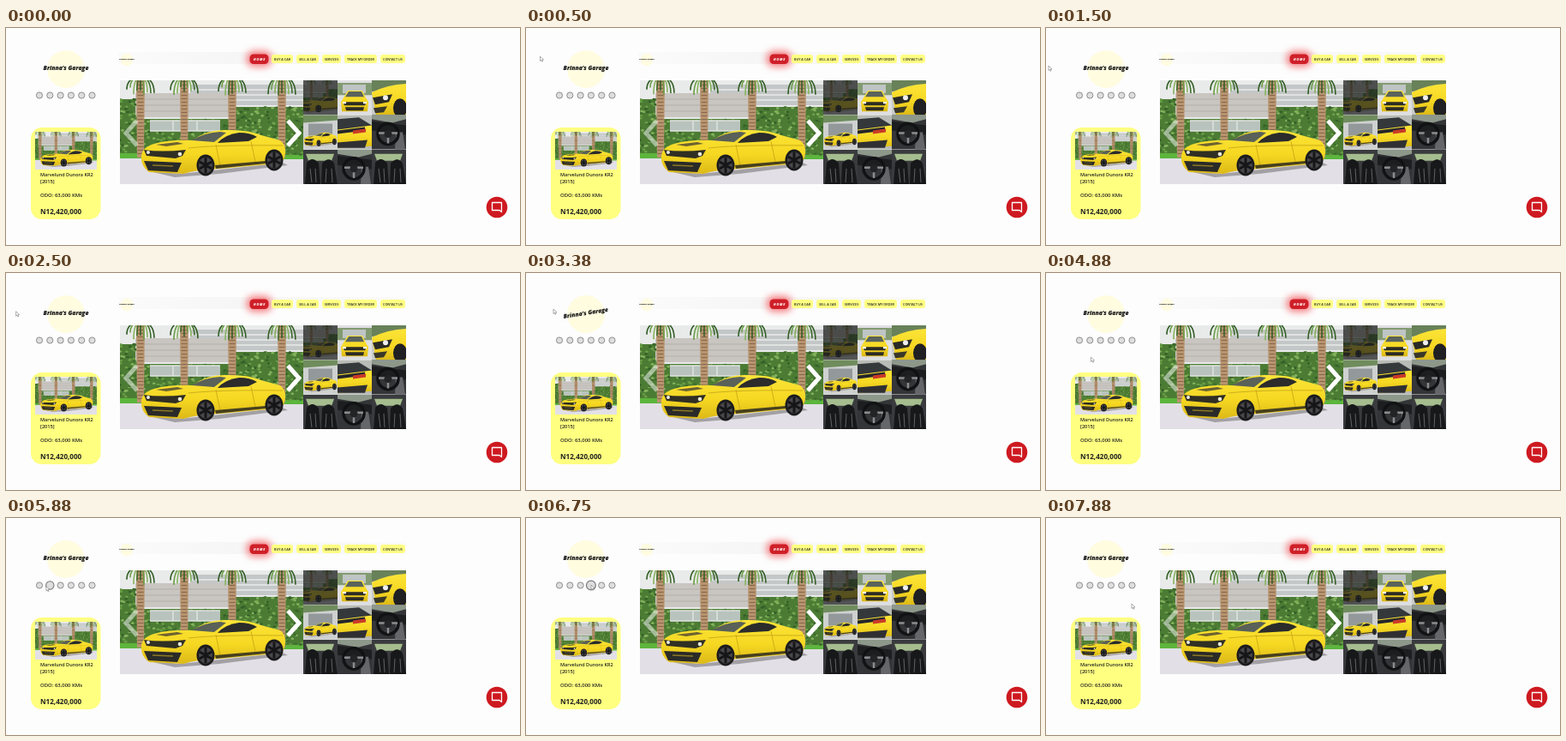
An HTML page that plays this animation: 600x253 px, repeating every 8 s.

```html
<!DOCTYPE html>
<html lang="en">
<head>
<meta charset="utf-8">
<title>Car shop</title>
<style>
  html, body { margin: 0; width: 100%; height: 100%; overflow: hidden; background: #fdfdfd; }
  svg { display: block; }
  text { font-family: "Open Sans", "Noto Sans", sans-serif; fill: #222; }
  .brand { font-weight: 800; font-style: italic; text-anchor: middle; fill: #111; }
  .nav { font-size: 3.75px; font-weight: 600; text-anchor: middle; }
</style>
</head>
<body>
<svg id="stage" width="600" height="253" viewBox="0 0 600 253">
  <defs>
    <linearGradient id="paint" x2="0" y2="1">
      <stop offset="0" stop-color="#fbe438"/><stop offset=".55" stop-color="#f6d822"/><stop offset="1" stop-color="#dcb917"/>
    </linearGradient>
    <linearGradient id="bar">
      <stop offset="0" stop-color="#fbfbfb"/><stop offset=".4" stop-color="#f6f6f6"/><stop offset="1" stop-color="#fafafa"/>
    </linearGradient>
    <g id="wheel">
      <ellipse rx="10.500" ry="12.500" fill="#1b1b1d"/>
      <ellipse rx="8" ry="9.500" fill="#48484c"/>
      <path d="M0-9V9M-7-4L7 4M-7 4L7-4" stroke="#161618" stroke-width="3"/>
    </g>
    <g id="car">
      <path d="M30 105L70 109 118 104 190 96 196 99 116 109 64 113Z" fill="#a3a0a5"/>
      <path d="M25 88Q26 78 40 74 58 69 85 70 100 58 122 58 150 57 165 64L187 70Q194 75 193 85L191 93 172 98 118 103Q90 104 74 109L34 107Q24 100 25 88Z" fill="url(#paint)"/>
      <path d="M84 70Q98 61 117 60L124 61 110 72Z" fill="#596158"/>
      <path d="M114 73Q123 63 139 61 152 61 160 66L150 71Z" fill="#2b2c2b"/>
      <path d="M42 75L67 72 74 74 54 77Z" fill="#6d6330"/>
      <path d="M28 81Q48 84 77 81L73 88 65 91 31 88Z" fill="#302f24"/>
      <path d="M28 94L72 96 67 107 33 105Z" fill="#2a2a28"/>
      <path d="M38 99L62 100" stroke="#8b7a24" stroke-width="1.500"/>
      <g fill="#e9e9dc"><circle cx="33" cy="84" r="2"/><circle cx="70" cy="86" r="2.300"/></g>
      <path d="M80 79Q115 75 190 76M112 75L117 100M153 71L158 95" fill="none" stroke="#c4a315" stroke-width=".8"/>
      <path d="M111 99L170 94V97L112 103Z" fill="#47401e"/>
      <use href="#wheel" x="100" y="99"/>
      <use href="#wheel" x="180" y="93"/>
    </g>
    <symbol id="photo" viewBox="0 0 214 121" preserveAspectRatio="xMidYMid slice">
      <rect width="214" height="121" fill="#e9eaea"/>
      <path d="M82 5H214V29H82Z" fill="#c3c7c7"/>
      <path d="M82 11H214M82 17H214M82 23H214" stroke="#e0e2e1" stroke-width="2"/>
      <path d="M0 22H20V45H128V31H214V90H0Z" fill="#4c7c34"/>
      <path d="M18 15H128V43H18Z" fill="#c9c5c1"/>
      <path d="M18 22H128M18 29H128M18 36H128" stroke="#b3afab"/>
      <path d="M0 90H214V121H0Z" fill="#e2e0e6"/>
      <path d="M0 85H30V91H0ZM190 87H214V92H190Z" fill="#5cb53c"/>
      <g id="leaves"></g>
      <path d="M35 47H117V59H35Z" fill="#b9c3bd"/>
      <path d="M35 47H117M35 59H117M62 47V59M90 47V59" stroke="#dfe4e0" stroke-width="1.500"/>
      <g id="palms"></g>
      <use href="#car"/>
    </symbol>
    <symbol id="garage" viewBox="0 0 40 40">
      <rect width="40" height="40" fill="#cfd1d0"/>
      <path d="M0 0H40V6L0 9Z" fill="#6f8c5d"/>
      <path d="M6 10H34V24H6Z" fill="#93999a"/>
      <use href="#car" transform="translate(-5 3) scale(.23 .3)"/>
    </symbol>
    <symbol id="cabin" viewBox="0 0 40 40">
      <rect width="40" height="40" fill="#343538"/>
      <path d="M0 0H40V5L24 9 0 5Z" fill="#8d988a"/>
      <path d="M0 7L40 12V23L0 18Z" fill="#1d1e20"/>
      <path d="M28 20H36L39 40H27Z" fill="#64666a"/>
      <circle cx="19" cy="22" r="12" fill="none" stroke="#111214" stroke-width="3.500"/>
      <path d="M8 21H30M19 22V33" stroke="#8b8d90" stroke-width="2.500"/>
      <circle cx="19" cy="22" r="4.500" fill="#232426"/>
    </symbol>
    <symbol id="seats" viewBox="0 0 40 40">
      <rect width="40" height="40" fill="#3a3b3e"/>
      <path d="M3 5H36L33 13H6Z" fill="#a5bd8e"/>
      <path d="M4 15Q11 7 18 16L20 40H2ZM22 16Q30 7 36 16L40 40H21Z" fill="#17181a"/>
      <path d="M8 22L10 38M14 22L15 38M27 22L26 38M33 22L34 38" stroke="#606266"/>
    </symbol>
    <symbol id="front" viewBox="0 0 40 40">
      <rect width="40" height="40" fill="#dfdfe2"/>
      <path d="M0 3H40V17H0Z" fill="#829a72"/>
      <path d="M6 5H33V15H6Z" fill="#bfc5c4"/>
      <path d="M12 12H29L33 20 36 25 35 36H5L4 25 7 20Z" fill="url(#paint)"/>
      <path d="M13 13H28L31 19H9Z" fill="#59635c"/>
      <path d="M6 25H34L32 29H8ZM9 31H31L30 35H10Z" fill="#2c2b25"/>
      <path d="M6 26H10M30 26H34" stroke="#fff" stroke-width="2.200"/>
    </symbol>
    <symbol id="lamp" viewBox="0 0 40 40">
      <rect width="40" height="40" fill="#c8cbc6"/>
      <path d="M0 0H40V9L0 13Z" fill="#698159"/>
      <path d="M0 14Q18 5 40 4V40H5Z" fill="url(#paint)"/>
      <path d="M1 20L24 16 20 25 4 28Z" fill="#292a27"/>
      <circle cx="16" cy="20" r="3" fill="#eee"/>
      <ellipse cx="33" cy="32" rx="8" ry="11" fill="#202022"/>
      <path d="M2 32L18 30 14 37 4 38Z" fill="#393828"/>
    </symbol>
    <symbol id="tail" viewBox="0 0 40 40">
      <rect width="40" height="40" fill="#b8bbb6"/>
      <path d="M0 5L25 3 40 12V18H0Z" fill="#34383a"/>
      <path d="M0 17L40 12V36L0 38Z" fill="url(#paint)"/>
      <path d="M0 18L32 14V18L0 22Z" fill="#25262a"/>
      <path d="M18 18L33 16V20L18 22Z" fill="#c93a28"/>
      <path d="M0 32L35 29 32 38H0Z" fill="#303033"/>
    </symbol>
    <g id="logo">
      <circle r="22" fill="#fffce0"/>
      <text class="brand" y="1" font-size="6.900">Brinna's Garage</text>
    </g>
  </defs>

  <g id="badge"><use href="#logo"/></g>
  <g id="social" fill="#dedede" stroke="#777" stroke-width=".8"></g>

  <rect x="29" y="116" width="81.500" height="107" rx="13" fill="#ffff80"/>
  <use href="#photo" x="34" y="121" width="72" height="44"/>
  <g font-size="5.950" font-weight="600">
    <text x="40" y="173" font-size="5.500">Marvelund Dunora KR2</text>
    <text x="40" y="181" font-size="5.700">[2015]</text>
    <text x="40" y="197">ODO: 63,000 KMs</text>
    <text x="40" y="217" font-size="8.100" font-weight="700">N12,420,000</text>
  </g>

  <rect x="131" y="28" width="336" height="14" fill="url(#bar)"/>
  <use href="#logo" transform="translate(141 37) scale(.33)"/>
  <rect x="281" y="27" width="29" height="18" rx="8" fill="#f4777b" style="filter:blur(4px)"/>
  <g id="menu"></g>

  <use href="#photo" x="133" y="61" width="214" height="121"/>
  <g id="thumbs"></g>
  <g fill="none" stroke="#fff" stroke-width="5">
    <path d="M153 108L140 122.500 153 137" opacity=".5"/>
    <path d="M329 108L342 122.500 329 137"/>
  </g>

  <circle cx="573" cy="209" r="12.300" fill="#ce1920"/>
  <path d="M567.500 203.500H578.500V214.500L576 212.500H567.500Z" fill="none" stroke="#fff" stroke-width="1.300" stroke-linejoin="round"/>
  <path id="cursor" d="M0 0V5.500L1.300 4.300 2.200 6.300 3.100 5.900 2.200 4H4Z" fill="#fff" stroke="#777" stroke-width=".6"/>
</svg>
<script>
const $ = id => document.getElementById(id);
const range = (n, draw) => Array.from({ length: n }, (_, i) => draw(i)).join('');
let seed = 7;
const random = () => (seed = seed * 16807 % 2147483647) / 2147483647;

// Hedge texture and palm trees
const greens = ['#345f28', '#6b9f48', '#86b35f', '#3f6f2e'];
$('leaves').innerHTML = range(520, i => {
  const x = random() * 214;
  const top = x < 20 ? 22 : x < 128 ? 46 : 31;
  return `<ellipse cx="${x}" cy="${top + random() * (87 - top)}" rx="1.800" ry="1.300" fill="${greens[i % 4]}"/>`;
});
$('palms').innerHTML = [24, 75, 131, 189].map(x => `
  <path d="M${x - 5} 0H${x + 5}L${x + 4} 90H${x - 4}Z" fill="#b8946f"/>
  <path d="M${x} 1V89" stroke="#86664b" stroke-width="7" stroke-dasharray="1 3"/>` +
  range(9, i => {
    const dx = (i - 4) * 4;
    return `<path d="M${x} -5Q${x + dx} -3 ${x + dx} ${8 + random() * 10}" fill="none" stroke="${greens[i % 4]}" stroke-width="1.600"/>`;
  })).join('');

const menu = [['BUY A CAR', 310, 335], ['SELL A CAR', 339, 365], ['SERVICES', 369, 391],
  ['TRACK MY ORDER', 395, 433], ['CONTACT US', 437, 466]];
$('menu').innerHTML = `<rect x="284.500" y="30.500" width="22" height="11.500" rx="4.500" fill="#cf1f28"/>
  <text class="nav" x="296" y="37.800" letter-spacing=".8" style="fill:#fff;font-weight:800;font-style:italic">HOME</text>` +
  menu.map(([label, left, right]) =>
    `<rect x="${left}" y="31" width="${right - left}" height="10" rx="3" fill="#ffff83"/>
     <text class="nav" x="${(left + right) / 2}" y="37.600">${label}</text>`).join('');

const shots = ['photo', 'front', 'lamp', 'garage', 'tail', 'cabin', 'seats', 'cabin', 'seats'];
$('thumbs').innerHTML = shots.map((shot, i) =>
  `<svg x="${347 + i % 3 * 40}" y="${61 + Math.floor(i / 3) * 40.333}" width="40" height="40.333" viewBox="0 0 40 40" preserveAspectRatio="none">
    <use href="#${shot}" width="40" height="40"/>
    ${i ? '' : '<rect width="40" height="40" fill="#1c1f1e" opacity=".72"/>'}</svg>`).join('');

const iconX = i => 39 + i * 12.3;
$('social').innerHTML = range(6, () => '<circle r="3.600"/>');
const icons = [...$('social').children];

// Pointer stops: time, x, y
const stops = [[125, 22, 24], [500, 16.500, 33], [1000, 2, 43], [1500, 3, 44], [2250, 8, 45], [3000, 22, 44],
  [3375, 32, 42], [4000, 30, 47], [4500, 42, 84], [4875, 52.500, 98], [5500, 39, 80], [6750, 76, 78],
  [7375, 99, 80], [7875, 100, 100]];
const smooth = v => (v = Math.min(1, Math.max(0, v)), v * v * (3 - 2 * v));

function pointerAt(t) {
  const i = Math.max(1, stops.findIndex(s => s[0] >= t));
  const [t0, x0, y0] = stops[i - 1], [t1, x1, y1] = stops[i];
  const k = smooth((t - t0) / (t1 - t0));
  return [x0 + (x1 - x0) * k, y0 + (y1 - y0) * k];
}

function render(now) {
  const t = Math.floor(now % 8000 / 125) * 125;
  const [x, y] = pointerAt(t);
  $('cursor').setAttribute('transform', `translate(${x} ${y})`);
  $('cursor').style.display = t < 125 ? 'none' : '';
  const tilt = -9 * (smooth((t - 2950) / 400) - smooth((t - 4100) / 400));
  $('badge').setAttribute('transform', `translate(70 48) rotate(${tilt})`);
  icons.forEach((icon, i) => {
    const scale = 1 + .5 * smooth(1.3 - Math.hypot(x - iconX(i), y - 78.5) / 6);
    icon.setAttribute('transform', `translate(${iconX(i)} 78.500) scale(${scale})`);
  });
  requestAnimationFrame(() => render(performance.now()));
}
render(0);
</script>
</body>
</html>
```
